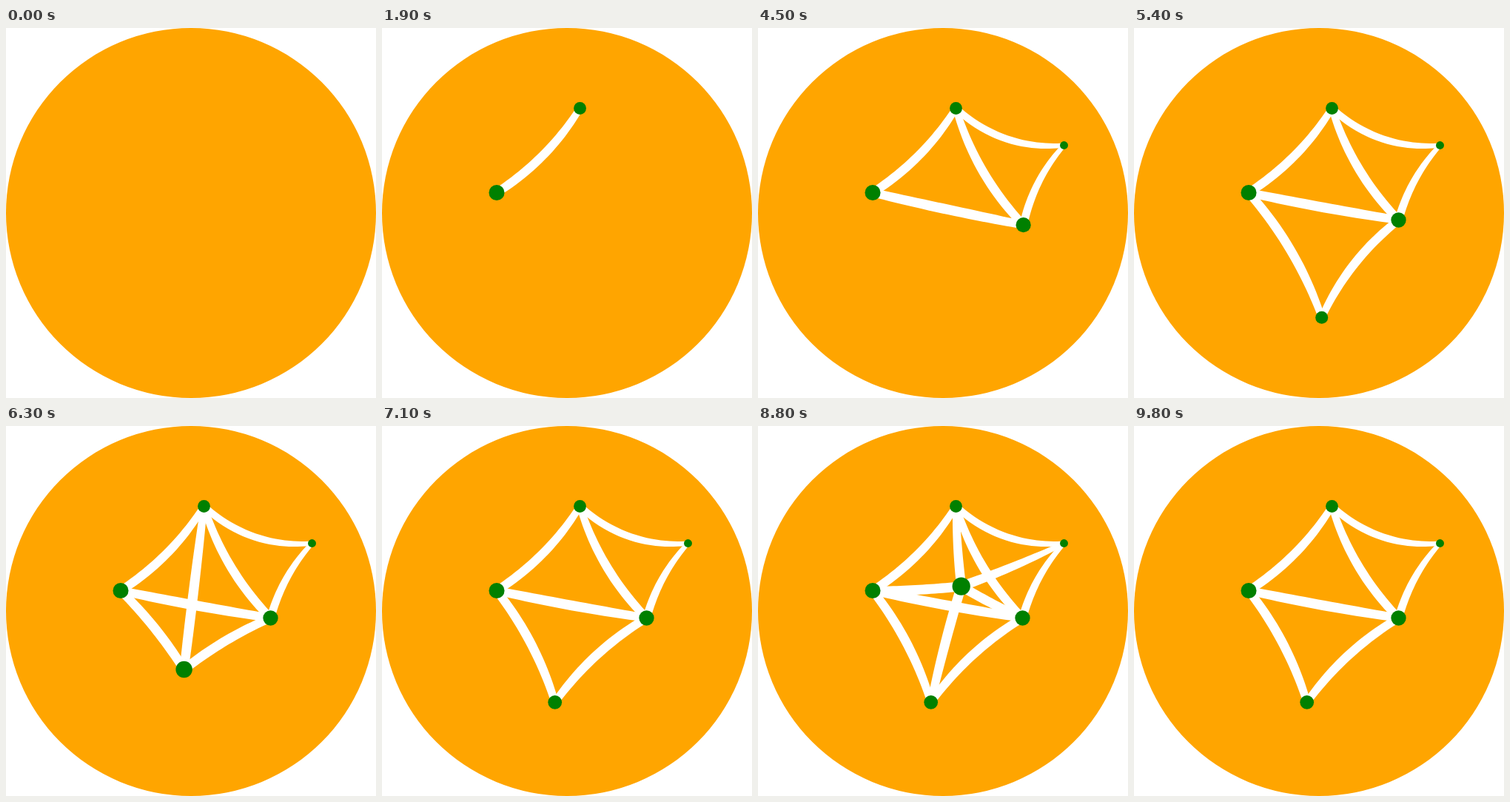
Animation of 500 by 500 pixels, one loop 9.9 s. Source, as an HTML page with a canvas:

```html
<!DOCTYPE html>
<html lang="en">
<head>
<meta charset="utf-8">
<title>Hyperbolic geometric graph</title>
<style>
html, body { margin: 0; width: 100%; height: 100%; overflow: hidden; background: #fff; }
canvas { display: block; }
</style>
</head>
<body>
<canvas id="stage" width="500" height="500"></canvas>
<script>
const ctx = document.getElementById("stage").getContext("2d");
const LOOP = 9900, STEP = 100, PAUSE = 150, R = 250;
const LINK_DISTANCE = 2;   // hyperbolic distance below which vertices are joined
const DOT = Math.tanh(0.05), HALF_EDGE = Math.tanh(0.0267);

// One pointer drags in the vertices in turn, each from where the last one rests.
const ENTRY = [-50, 4, 357];
const drags = [
  [[600, 155, 222.5]],
  [[1900, 267.5, 108.5]],
  [[3100, 413.5, 158.5]],
  [[3700, 405.5, 230.3], [4100, 362, 286], [4700, 357.5, 259.5]],
  [[5400, 253.7, 391.3], [6300, 240.6, 329], [7100, 233.7, 373.3]],
  [[7800, 89, 373.3], [9700, 432, 84]],
];
const paths = drags.map((stops, i) => {
  const [ms, x, y] = i ? drags[i - 1].at(-1) : ENTRY;
  return [[ms + PAUSE, x, y], ...stops];
});

// Complex arithmetic on [re, im]
const mul = (a, b) => [a[0] * b[0] - a[1] * b[1], a[0] * b[1] + a[1] * b[0]];
const scale = (a, k) => [a[0] * k, a[1] * k];
const norm2 = a => a[0] * a[0] + a[1] * a[1];

// Moebius translation taking the disk's centre to a
function translate(a, z) {
  const den = mul([a[0], -a[1]], z);
  den[0] += 1;
  const num = mul([a[0] + z[0], a[1] + z[1]], [den[0], -den[1]]);
  return scale(num, 1 / norm2(den));
}

function position(path, t) {
  const i = Math.max(1, path.findIndex(stop => t <= stop[0]));
  const next = t > path.at(-1)[0] ? path.length - 1 : i;
  const [t0, x0, y0] = path[next - 1], [t1, x1, y1] = path[next];
  const k = Math.min(1, (t - t0) / (t1 - t0));
  const ease = (1 - Math.cos(Math.PI * k)) / 2;
  return [(x0 + (x1 - x0) * ease) / R - 1, (y0 + (y1 - y0) * ease) / R - 1];
}

// Hyperbolic centre of a dot whose Euclidean centre is c
const dotCentre = c => scale(c, 1 + DOT * DOT * (1 - norm2(c)));

// Band of constant hyperbolic width around the geodesic from a to b
function drawEdge(a, b) {
  const z = translate([-a[0], -a[1]], b);
  const length = Math.sqrt(norm2(z));
  if (length < 1e-4 || 2 * Math.atanh(length) > LINK_DISTANCE) return;
  const dir = scale(z, 1 / length), n = 24;
  ctx.beginPath();
  for (const side of [1, -1]) {
    for (let i = 0; i <= n; i++) {
      const k = side > 0 ? i / n : 1 - i / n;
      const along = Math.tanh(Math.atanh(length) * k);
      const local = translate([along, 0], [0, side * HALF_EDGE]);
      const [x, y] = translate(a, mul(local, dir));
      ctx.lineTo(R + x * R, R + y * R);
    }
  }
  ctx.fill();
}

function disc(x, y, r, color) {
  ctx.fillStyle = color;
  ctx.beginPath();
  ctx.arc(x, y, r, 0, 2 * Math.PI);
  ctx.fill();
}

function draw(t) {
  // A vertex dropped at the rim leaves the disk.
  const points = paths
    .filter(p => t >= p[0][0])
    .map(p => ({ c: position(p, t), dropped: t > p.at(-1)[0] }))
    .filter(v => !(v.dropped && norm2(v.c) > 0.9))
    .map(v => v.c);
  ctx.clearRect(0, 0, 2 * R, 2 * R);
  disc(R, R, R, "orange");
  ctx.fillStyle = "white";
  const centres = points.filter(p => norm2(p) < 1).map(dotCentre);
  centres.forEach((a, i) => centres.slice(0, i).forEach(b => drawEdge(a, b)));
  for (const p of points) {
    disc(R + p[0] * R, R + p[1] * R, R * DOT * Math.abs(1 - norm2(p)), "green");
  }
}

const start = performance.now();
function tick() {
  const t = (performance.now() - start) % LOOP;
  draw(Math.floor(t / STEP) * STEP);
  requestAnimationFrame(tick);
}
tick();
</script>
</body>
</html>
```
